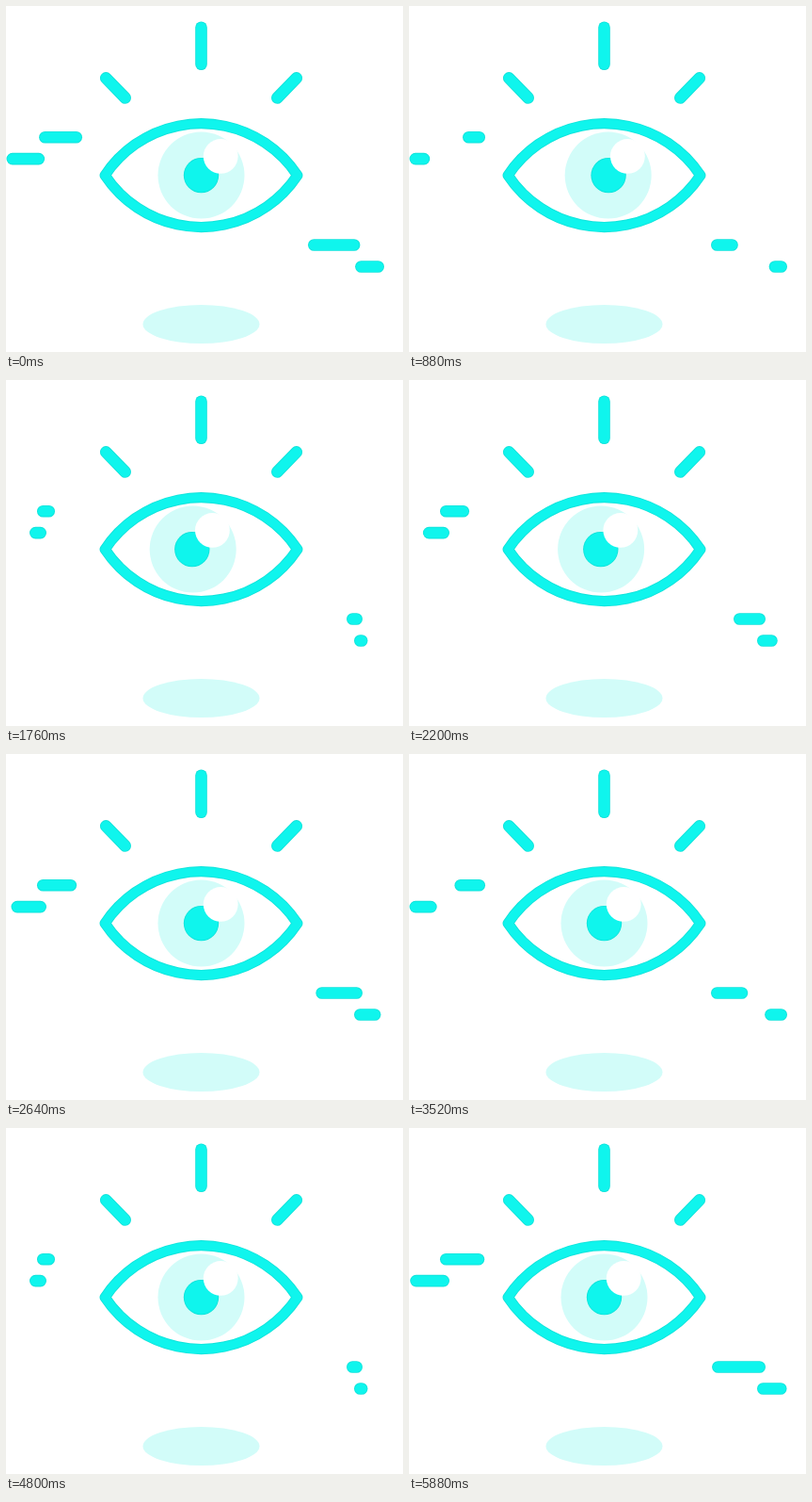
These frames come from a looping animation (422 px wide and 367 px high, 5920 ms). An HTML page with a canvas:

```html
<!DOCTYPE html>
<html lang="en">
<head>
<meta charset="utf-8">
<title>Eye</title>
<style>
  html, body { margin: 0; width: 100%; height: 100%; overflow: hidden; background: #fff; }
  canvas { display: block; }
</style>
</head>
<body>
<canvas id="stage" width="422" height="367"></canvas>
<script>
const ctx = document.getElementById('stage').getContext('2d');
const LOOP = 5920, STEP = 40, DASH_CYCLE = 3000, DASH_LEAD = 80;
const CYAN = '#0ff5ed', RIM = '#0fe3db', PALE = '#d2fcf9', WHITE = '#fff';
const CX = 207.5, CY = 179.6, CAP = 6.3, RIM_WIDTH = 0.9;

// Each dash: y, then [left, right] when full, parked at the outer end, parked at the inner end
const dashes = [
  { y: 139.2, full: [33, 81], outer: [64.3, 81], inner: [33, 52] },
  { y: 162.1, full: [0.5, 43], outer: [0.5, 16], inner: [25, 43] },
  { y: 253.5, full: [321, 379], outer: [321, 341], inner: [362, 379] },
  { y: 276.5, full: [370, 402], outer: [386.5, 402], inner: [370, 384.5] }
];

// Each lash: inner end, then outer end
const lashes = [
  [CX, 61.7, CX, 22.7],
  [126.7, 97.5, 106.2, 76.4],
  [288.3, 97.5, 308.8, 76.4]
];

const gazeKeys = [[640, 0], [1180, 10], [1840, -9.6], [2440, 0]];
const squintKeys = [[3640, 0], [4160, 1], [4720, 0]];

const mix = (a, b, p) => a + (b - a) * p;
const span = (t, a, b) => Math.min(1, Math.max(0, (t - a) / (b - a)));
const smooth = p => p * p * (3 - 2 * p);
const slowing = (p, k) => p * (1 + k - k * p);

function keyed(t, keys) {
  let value = keys[0][1];
  for (let i = 1; i < keys.length; i++) {
    value = mix(value, keys[i][1], smooth(span(t, keys[i - 1][0], keys[i][0])));
  }
  return value;
}

// Strokes the current path in cyan with a thin darker rim
function strokeRimmed(width) {
  ctx.strokeStyle = RIM;
  ctx.lineWidth = width;
  ctx.stroke();
  ctx.strokeStyle = CYAN;
  ctx.lineWidth = width - 2 * RIM_WIDTH;
  ctx.stroke();
}

function line(x1, y1, x2, y2) {
  ctx.beginPath();
  ctx.moveTo(x1, y1);
  ctx.lineTo(x2, y2);
  strokeRimmed(CAP * 2);
}

function oval(x, y, rx, ry, color) {
  ctx.fillStyle = color;
  ctx.beginPath();
  ctx.ellipse(x, y, rx, ry, 0, 0, Math.PI * 2);
  ctx.fill();
}

function drawDash(dash, u) {
  let from = dash.full, to = dash.outer, p = slowing(span(u, 0, 1280), 0.1);
  if (u > 1880) {
    from = dash.inner;
    to = dash.full;
    p = slowing(span(u, 1880, 3000), 0.25);
  } else if (u > 1280) {
    from = dash.outer;
    to = dash.inner;
    p = span(u, 1280, 1800);
  }
  line(mix(from[0], to[0], p) + CAP, dash.y, mix(from[1], to[1], p) - CAP, dash.y);
}

function eyePath() {
  const half = 102.3, rise = 54.9;
  const r = (half * half + rise * rise) / (2 * rise);
  const a = Math.asin(half / r), q = Math.PI / 2;
  ctx.beginPath();
  ctx.arc(0, r - rise, r, -q - a, -q + a);
  ctx.arc(0, rise - r, r, q - a, q + a);
  ctx.closePath();
}

function drawEye(gaze, lid) {
  ctx.save();
  ctx.translate(CX, CY);
  ctx.save();
  ctx.scale(1, lid);
  eyePath();
  ctx.restore();
  ctx.save();
  ctx.clip();
  oval(gaze, 0, 46, 46, PALE);
  const pupil = gaze * 1.1;
  oval(pupil, 0, 18.7, 18.7, RIM);
  oval(pupil, 0, 18.7 - RIM_WIDTH, 18.7 - RIM_WIDTH, CYAN);
  oval(gaze + 20.7, -20.2, 18.4, 18.4, WHITE);
  ctx.restore();
  ctx.scale(1, lid);
  eyePath();
  strokeRimmed(11.2);
  ctx.restore();
}

function draw(t) {
  ctx.fillStyle = WHITE;
  ctx.fillRect(0, 0, 422, 367);
  ctx.lineCap = ctx.lineJoin = 'round';

  const squint = keyed(t, squintKeys);
  for (const [x1, y1, x2, y2] of lashes) {
    const reach = 1 - 0.53 * squint;
    line(x1, y1, mix(x1, x2, reach), mix(y1, y2, reach));
  }
  for (const dash of dashes) drawDash(dash, (t + DASH_LEAD) % DASH_CYCLE);
  oval(CX, 337.5, 62, 20.5, PALE);
  drawEye(keyed(t, gazeKeys), 1 - 0.2 * squint);
}

const start = performance.now();
function tick() {
  const t = (performance.now() - start) % LOOP;
  draw(Math.floor(t / STEP) * STEP);
  requestAnimationFrame(tick);
}
tick();
</script>
</body>
</html>
```
